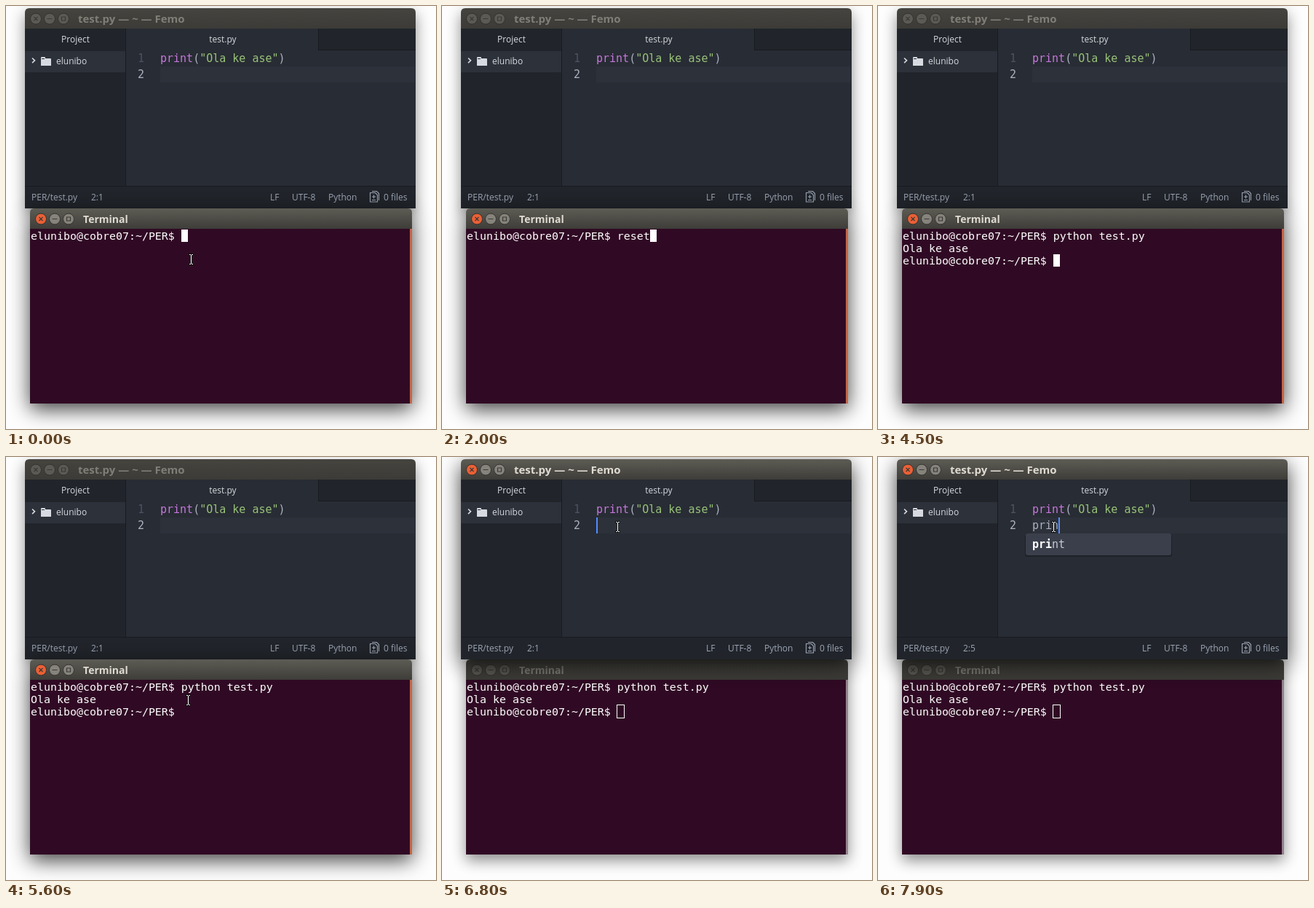
An HTML page for the animation above (8000 ms loop, 591x581 px).

```html
<!DOCTYPE html>
<html lang="en">
<head>
<meta charset="utf-8">
<title>Editor and terminal</title>
<style>
html, body { margin: 0; width: 100%; height: 100%; overflow: hidden; background: #fdfdfd; }
svg { display: block; width: 591px; height: 581px; --btn: #85837b; --close: #ea6036; }
text { white-space: pre; }
.ui { font: 12px "Open Sans", "Noto Sans", sans-serif; fill: #9da5b4; }
.light { fill: #d7dae0; }
.mid { text-anchor: middle; }
.title { font: bold 15px "Open Sans", "Noto Sans", sans-serif; fill: #dfdbd2; }
.mono { font: 15px "DejaVu Sans Mono", monospace; fill: #abb2bf; }
.term { font-size: 14.95px; fill: #fff; }
.bar { fill: url(#barOn); }
.shadow { filter: url(#blurOn); opacity: .75; }
.btn { fill: var(--btn); stroke: #33322e; }
.close { fill: var(--close); }
.glyph { fill: none; stroke: #3a3935; stroke-width: 1.2; }
.scroll { fill: #c56545; }
.idle { --btn: #5b5a54; --close: #5b5a54; }
.idle .title { fill: #807e77; }
.idle .bar { fill: url(#barOff); }
.idle .shadow { filter: url(#blurOff); opacity: .45; }
.idle .scroll { fill: #94818c; }
</style>
</head>
<body>
<svg viewBox="0 0 591 581">
  <defs>
    <linearGradient id="barOn" x2="0" y2="1">
      <stop stop-color="#5d5c54"/><stop offset="1" stop-color="#3e3d39"/>
    </linearGradient>
    <linearGradient id="barOff" x2="0" y2="1">
      <stop stop-color="#45443f"/><stop offset="1" stop-color="#3c3b37"/>
    </linearGradient>
    <filter id="blurOn" x="-20%" y="-30%" width="140%" height="160%"><feGaussianBlur stdDeviation="14"/></filter>
    <filter id="blurOff" x="-20%" y="-30%" width="140%" height="160%"><feGaussianBlur stdDeviation="10"/></filter>
    <g id="buttons">
      <circle class="btn close" r="7.5"/>
      <circle class="btn" cx="19" r="7.5"/>
      <circle class="btn" cx="38" r="7.5"/>
      <path class="glyph" d="M-2.5-2.5l5 5m0-5l-5 5M15.5 0h7M35.5-2.5h5v5h-5z"/>
    </g>
  </defs>

  <g id="editor">
    <rect class="shadow" x="26" y="11" width="537" height="275"/>
    <path class="bar" d="M26 31V9q0-6 6-6H557q6 0 6 6V31z"/>
    <use href="#buttons" x="41" y="17.5"/>
    <text class="title" x="99" y="23">test.py — ~ — Femo</text>
    <rect x="26" y="31" width="537" height="247" fill="#21252b"/>
    <rect x="165" y="31" width="398" height="216" fill="#282c34"/>
    <rect x="429" y="31" width="134" height="30" fill="#21252b"/>
    <path d="M164.5 31V247M429.5 31V60.5H563M26 247.5H563" fill="none" stroke="#181a1f"/>
    <rect x="26" y="62" width="138" height="29" fill="#2c313a"/>
    <rect x="212" y="83" width="350" height="22" fill="#2c313a"/>
    <text class="ui light mid" x="95.5" y="50">Project</text>
    <text class="ui light mid" x="298" y="50">test.py</text>
    <path d="M36 71.5l3.5 3.3-3.5 3.3" fill="none" stroke="#d7dae0" stroke-width="1.6"/>
    <path d="M48 82V71q0-1 1-1h4q1 0 1 1v1h7q1 0 1 1v9z" fill="#d7dae0"/>
    <path d="M49 72.5h4" stroke="#2c313a"/>
    <text class="ui light" x="69" y="80">elunibo</text>
    <text class="mono" x="181" y="77" style="fill:#4b5364">1</text>
    <text class="mono" x="181" y="99">2</text>
    <text class="mono" x="212" y="77"><tspan fill="#c678dd">print</tspan>(<tspan fill="#98c379">"Ola ke ase"</tspan>)</text>
    <text class="mono" id="typed" x="212" y="99"></text>
    <rect id="caret" y="83" width="2" height="22" fill="#528bff"/>
    <g class="ui">
      <text x="35" y="267">PER/test.py</text>
      <text id="position" x="117" y="267"></text>
      <text x="363" y="267">LF</text>
      <text x="393" y="267">UTF-8</text>
      <text x="443" y="267">Python</text>
      <text x="519" y="267">0 files</text>
    </g>
    <path d="M500.5 256.5h7l3 3v9.5h-10zM503 254.5h6.5l3 3v9.5M505.5 259.5v5M503 262h5M503 266.5h5" fill="none" stroke="#9da5b4" stroke-width="1.1"/>
    <g id="popup">
      <rect x="202" y="107" width="202" height="30" rx="3" fill="#000" opacity=".25"/>
      <rect x="203" y="105" width="200" height="30" rx="3" fill="#3a3f4b"/>
      <text class="mono" x="212" y="125" style="fill:#c5cad3"><tspan font-weight="bold" fill="#fff">pri</tspan>nt</text>
    </g>
  </g>

  <g id="terminal">
    <rect class="shadow" x="33" y="286" width="525" height="268"/>
    <path class="bar" d="M33 306V284q0-6 6-6H552q6 0 6 6V306z"/>
    <use href="#buttons" x="48" y="292.5"/>
    <text class="title" x="106" y="298" style="font-size:14px">Terminal</text>
    <rect x="33" y="306" width="525" height="240" fill="#300a24"/>
    <rect class="scroll" x="555" y="306" width="3" height="240"/>
    <text class="mono term" id="row0" x="34" y="321"></text>
    <text class="mono term" id="row1" x="34" y="338"></text>
    <text class="mono term" id="row2" x="34" y="355"></text>
    <rect id="block" width="9" height="17" fill="#fff"/>
    <rect id="hollow" x="240.5" y="340.5" width="10" height="18" fill="none" stroke="#fff"/>
  </g>

  <g id="mouse" fill="none">
    <path d="M-3-6.5H3.5M-3 6.5H3.5M.5-6.5V6.5" stroke="#000" stroke-width="3" opacity=".75"/>
    <path d="M-2-6.5H0M1-6.5H3M-2 6.5H0M1 6.5H3M.5-6V6" stroke="#fff" stroke-width="1.2"/>
  </g>
</svg>
<script>
const LOOP = 8000, STEP = 100, CELL = 9, ROW = 17;
const PROMPT = 'elunibo@cobre07:~/PER$ ';
const el = id => document.getElementById(id);
const svg = document.querySelector('svg');
const show = (id, on) => el(id).setAttribute('visibility', on ? 'visible' : 'hidden');
const write = (id, text) => { el(id).textContent = text; };
const latest = (list, t) => list.filter(entry => entry[0] <= t).pop()[1];

const commands = [[0, ''], [1900, 're'], [2000, 'reset'], [2500, ''], [2600, 'python test.py']];
const blinkStarts = [[0, -300], [1900, 1900], [2000, 2000], [2500, 2500], [2600, 2600], [4400, 4400], [4500, 4500]];
const typing = [[0, ''], [7500, 'p'], [7600, 'pr'], [7700, 'pri'], [7900, 'prin']];
const mousePath = [[250, 334], [244, 292], [224, 224], [202, 160], [183, 108], [196, 79], [227, 89], [241, 96]];

function mouseAt(t) {
  if (t < 1900) return [254, 348];
  if (t < 5600) return null;
  return mousePath[Math.min(mousePath.length - 1, (t - 5600) / STEP)];
}

function setFocus(name) {
  if (svg.dataset.focus === name) return;
  svg.dataset.focus = name;
  for (const id of ['editor', 'terminal']) el(id).setAttribute('class', id === name ? '' : 'idle');
  svg.insertBefore(el(name), el('mouse'));
}

function drawTerminal(t, focused) {
  const command = latest(commands, t);
  const done = t >= 4500;
  write('row0', PROMPT + command);
  write('row1', done ? 'Ola ke ase' : '');
  write('row2', done ? PROMPT : '');

  const row = done ? 2 : t >= 4400 ? 1 : 0;
  const column = [PROMPT.length + command.length, 0, PROMPT.length][row];
  el('block').setAttribute('x', 34 + column * CELL);
  el('block').setAttribute('y', 307 + row * ROW);
  const lit = Math.floor((t - latest(blinkStarts, t)) / 600) % 2 === 0;
  show('block', focused && lit);
  show('hollow', !focused);
}

function drawEditor(t, focused) {
  const typed = latest(typing, t);
  write('typed', typed);
  write('position', '2:' + (typed.length + 1));
  el('caret').setAttribute('x', 212 + typed.length * CELL);
  show('caret', focused && (t < 7200 || t >= 7500));
  show('popup', t >= 7800);
  // The list opens at the caret, then lines up with the word.
  el('popup').setAttribute('transform', `translate(${t < 7900 ? 3 * CELL : 0})`);
}

function draw(time) {
  const t = Math.floor(time % LOOP / STEP) * STEP;
  const editing = t >= 6800;
  setFocus(editing ? 'editor' : 'terminal');
  drawTerminal(t, !editing);
  drawEditor(t, editing);
  const mouse = mouseAt(t);
  show('mouse', mouse);
  if (mouse) el('mouse').setAttribute('transform', `translate(${mouse})`);
}

const start = performance.now();
function tick() {
  draw(performance.now() - start);
  requestAnimationFrame(tick);
}
tick();
</script>
</body>
</html>
```
